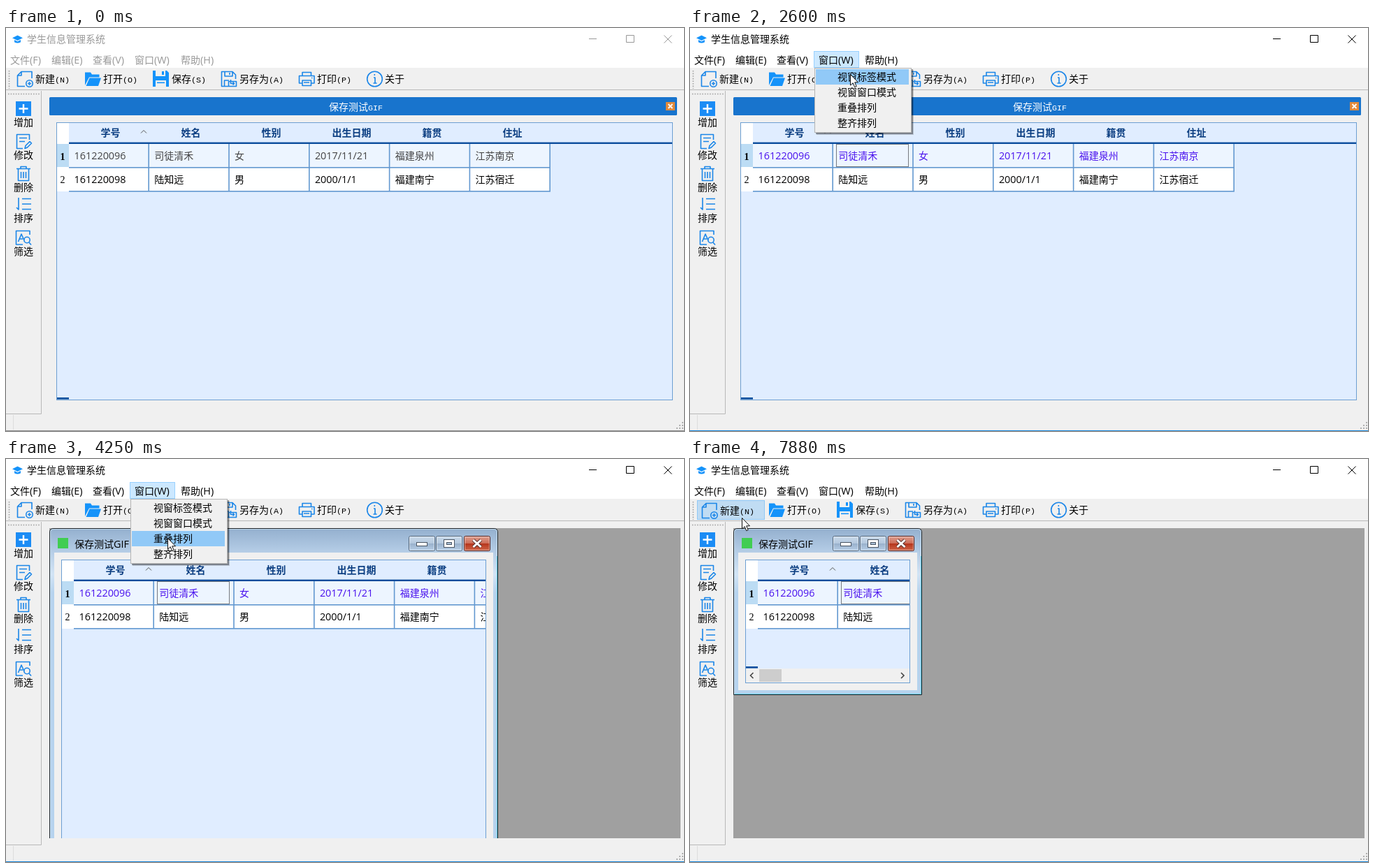
Write an HTML page that moves like this. It is 970x577 px and loops after 8 s.

```html
<!DOCTYPE html>
<html lang="zh-CN">
<head>
<meta charset="utf-8">
<title>学生信息管理系统</title>
<style>
html, body { margin: 0; width: 100%; height: 100%; overflow: hidden; background: #f0f0f0; }
svg { display: block; }
text { font: 14px "Noto Sans CJK SC", "Noto Sans CJK", sans-serif; white-space: pre; }
.l { font: 14.4px "Open Sans", "Noto Sans", sans-serif; }
.m .l { font: 11.7px "Liberation Mono", monospace; }
.n { font: 14px "Liberation Serif", serif; }
.h { font-weight: 700; fill: #0a3d80; }
.c { text-anchor: middle; }
.b { font-weight: 700; }
.chrome { fill: #999; }
.ctl { fill: none; stroke: #999; }
.edge { fill: #8c8c8c; }
.sel { fill: #444; }
.focus { fill: none; stroke: #000; stroke-dasharray: 1 1; display: none; }
.active .chrome { fill: #000; }
.active .ctl { stroke: #000; }
.active .edge { fill: #1a86d9; }
.active .sel { fill: #4a12ee; }
.active .focus { display: inline; }
.i { fill: none; stroke: #1b86e8; stroke-width: 1.6; stroke-linejoin: round; }
.f { fill: #1593fa; }
</style>
</head>
<body>
<svg id="stage" width="970" height="577" viewBox="0 0 970 577"></svg>
<script>
const rect = (x, y, w, h, fill, more = '') =>
  `<rect x="${x}" y="${y}" width="${w}" height="${h}" fill="${fill}" ${more}/>`;
const box = (x, y, w, h, fill, stroke, more = '') =>
  rect(x + .5, y + .5, w - 1, h - 1, fill, `stroke="${stroke}" ${more}`);
const path = (d, cls = 'i', more = '') => `<path d="${d}" class="${cls}" ${more}/>`;
const line = (d, color, width = 1) => path(d, '', `fill="none" stroke="${color}" stroke-width="${width}"`);
// x, vertical centre, text; Latin runs get their own face
const text = (x, y, s, cls = '') =>
  `<text x="${x}" y="${y + 5}" class="${cls}">${s.replace(/[ -~]+/g, r => `<tspan class="l">${r}</tspan>`)}</text>`;
const clip = (x, y, w, h, body) => `<svg x="${x}" y="${y}" width="${w}" height="${h}">${body}</svg>`;
const group = (id, body) => `<g id="${id}">${body}</g>`;

const heads = ['学号', '姓名', '性别', '出生日期', '籍贯', '住址'];
const rows = [
  ['161220096', '司徒清禾', '女', '2017/11/21', '福建泉州', '江苏南京'],
  ['161220098', '陆知远', '男', '2000/1/1', '福建南宁', '江苏宿迁']
];

function table(x, y, w, h, scroll) {
  const grid = '#6398d0', dark = '#0b4c9c';
  let s = rect(0, 0, w, h, '#e0edff') + rect(1, 1, 17, 98, '#fff') + rect(1, 31, 17, 33, '#bcdcf4');
  s += rect(18, 31, 688, 33, '#edf5ff') + rect(18, 65, 688, 33, '#fff');
  s += rect(18, 64, 689, 1.6, grid) + rect(18, 98, 689, 1.6, grid);
  heads.forEach((t, i) => {
    s += rect(131.4 + 114.8 * i, 31, 1.6, 68, grid);
    s += text(77.5 + 115 * i, 15, t, 'h c');
    rows.forEach((r, j) => s += text(25.5 + 114.8 * i, 47.5 + 34 * j, r[i], j ? '' : 'sel'));
  });
  s += rect(18, 28.6, w, 2.4, dark) + line('M121 15.5l4-4 4 4', '#555');
  s += `<text x="9" y="54" class="n c b">1</text><text x="9" y="87" class="n c">2</text>`;
  s += '<rect x="137.5" y="31.5" width="103" height="32" class="focus"/>';
  s += rect(0, h - (scroll ? 24 : 4), 18, 2.6, dark);
  if (scroll) {
    s += rect(1, h - 21, w - 2, 20, '#f0f0f0') + rect(20, h - 20, 32, 18, '#cdcdcd');
    s += line(`M11.5 ${h - 15}l-4 4 4 4M${w - 13} ${h - 15}l4 4-4 4`, '#444', 1.6);
  }
  return clip(x, y, w, h, s + box(0, 0, w, h, 'none', '#6d9fd2'));
}

function subWindow(w, h, scroll) {
  const button = (x, fill, edge) =>
    box(x, 11, 38, 22, fill, edge, 'rx="2"') + box(x + 1, 12, 36, 20, 'none', '#fff', 'rx="1" stroke-opacity=".45"');
  const a = w - 128, b = w - 89, c = w - 49;
  const frame = i => `M${i} ${h - i}V6Q${i} ${i} 6 ${i}H${w - 6}Q${w - i} ${i} ${w - i} 6V${h - i}Z`;
  return path(frame(.5), '', 'fill="url(#aero)" stroke="#1c2228"') +
    path(frame(1.5), '', 'fill="none" stroke="#d5ecf8" stroke-opacity=".75"') +
    line(`M${w - 1.5} 40V${h - 1.5}H2`, '#62d2ea') +
    rect(7, 35, w - 14, h - 42, '#f0f0f0') +
    rect(12, 14, 15, 15, '#41cd52') + text(36, 22.5, '保存测试GIF') +
    button(a, 'url(#glass)', '#54677c') + button(b, 'url(#glass)', '#54677c') + button(c, 'url(#red)', '#5c2018') +
    box(a + 11, 20, 16, 6, '#fff', '#4a5563') +
    box(b + 11, 16, 16, 12, '#fff', '#4a5563') + box(b + 15, 20, 8, 4, '#a9bfd6', '#4a5563') +
    line(`M${c + 13.5} 17l11 10m0-10l-11 10`, '#5a3430', 5) + line(`M${c + 13.5} 17l11 10m0-10l-11 10`, '#fff', 3) +
    table(17, 45, w - 34, h - 62, scroll);
}

const gradient = (id, y, stops) => `<linearGradient id="${id}" gradientUnits="${y ? 'userSpaceOnUse' : 'objectBoundingBox'}"
  x1="0" x2="0" y1="0" y2="${y || 1}">${stops.map(([o, c]) => `<stop offset="${o}" stop-color="${c}"/>`).join('')}</linearGradient>`;

const defs = '<defs>' +
  gradient('aero', 100, [[0, '#93afce'], [.35, '#b6cee7'], [.66, '#d2e4f5'], [.92, '#b6d3ee']]) +
  gradient('glass', 0, [[0, '#cbdbeb'], [.48, '#b4c8de'], [.5, '#98b0cb'], [1, '#b9d0e8']]) +
  gradient('red', 0, [[0, '#e0a293'], [.48, '#cd6d58'], [.5, '#b5341b'], [1, '#d0674a']]) + '</defs>';

function chrome() {
  let s = rect(0, 0, 970, 577, '#f0f0f0') + rect(0, 0, 970, 57, '#fff');
  s += path('M9 14.3L16.5 10.5L24 14.3L16.5 18ZM12 17V20.2Q16.5 23 21 20.2V17L16.5 19.3Z', 'f');
  s += text(30, 16, '学生信息管理系统', 'chrome');
  s += path('M834 15.5h11M887.5 10.5h11v10h-11zM941.5 10.5l11 11m0-11l-11 11', 'ctl');
  s += line('M0 88.5H970M50.5 90V552.5H0', '#b9b9b9') + line('M10.5 554V575', '#dcdcdc');
  s += path('M4.5 61V87M3 94.5H49', '', 'stroke="#a0a0a0" stroke-width="1.6" stroke-dasharray="1.6 2"');
  for (let i = 0; i < 3; i++) for (let j = 0; j <= i; j++) s += rect(967 - 4 * j, 564 + 4 * i, 2, 2, '#b0b0b0');
  return s + '<rect y="576" width="970" height="1" class="edge"/>';
}

const floppyDisk = '<path fill-rule="evenodd" class="f" d="M210 61h20l3 3v20h-23zM214 61v8h14v-8zM214 75v9h15v-9z"/>' +
  rect(223, 62, 3, 5, '#1593fa') + rect(216, 77.5, 11, 1.6, '#1593fa');

const tools = [
  [42, '新建(N)', path('M37 72V62.5H22L16.5 68V83.5H27M22 62.5V68H16.5') +
    '<circle cx="33.5" cy="79.5" r="4.7" class="i"/>' + path('M33.5 77v5M31 79.5h5')],
  [139, '打开(O)', path('M113 82V63.5h8l2 3h10.5v4H119z', 'f') + path('M119.5 71.5H136L132 83H114.5z', 'f')],
  [237, '保存(S)', floppyDisk],
  [334, '另存为(A)', path('M318 83.5H308.5V62.5H324L328.5 67V73M313 62.5V69h11v-6.5M320 64v3M312.5 83V75H319') +
    path('M318.5 76.5H329.5V83.5H318.5zM321.5 74v5.5h5m-2-2l2 2-2 2')],
  [445, '打印(P)', path('M424 68V63.5H436.5V68M424 79H419.5V68.5H441V79H436.5M424 75H436.5V82.5H424zM426 78h8M437 71.5h1.5')],
  [542, '关于', '<circle cx="527.5" cy="73" r="10.8" class="i"/>' + path('M526 71h2v8m-2.5 0h5M527.3 66v2')]
];

const sideTools = [
  [135, '增加', rect(14, 105, 22, 21, '#1b8cf5') + line('M25 109v13M18.5 115.5h13', '#fff', 2.4)],
  [182, '修改', path('M33.5 160V152.5H15.5V172.5H24M19 157.5h11M19 162.5h8M27 172.5l1-4 6-6 2.5 2.5-6 6z')],
  [228, '删除', path('M15 201.5H35M21 201V198.5H29V201M17.5 202V218.5H32.5V202M21.5 206v9M25 206v9M28.5 206v9')],
  [272, '排序', path('M18 243V260l-3-3M23 244.5H36M23 252H36M23 259.5H36')],
  [320, '筛选', path('M34 296V290.5H14.5V310H24M17.5 306L22 295l4 9M19 302h5') +
    '<circle cx="30" cy="303.5" r="4.2" class="i"/>' + path('M33 307l3 3.5')]
];

const menus = [[6, '文件(F)'], [65, '编辑(E)'], [124, '查看(V)'], [184, '窗口(W)'], [250, '帮助(H)']];
const items = ['视窗标签模式', '视窗窗口模式', '重叠排列', '整齐排列'];

const tabView = rect(62, 99, 898, 26, '#1874cd', 'rx="1.5"') + text(462, 112.5, '保存测试GIF', 'm').replace('<text', '<text fill="#fff"') +
  rect(944, 106, 13, 12, '#e08a3c') + line('M947.5 109l6 6m0-6l-6 6', '#fff', 1.8) + table(72, 135, 882, 398);

stage.innerHTML = defs + chrome() +
  box(177, 33, 65, 24, '#cce8ff', '#99d1ff', 'id="menuHot"') +
  menus.map(([x, s]) => text(x, 46, s, 'chrome')).join('') +
  box(10, 59, 97, 28, '#d8e6f2', '#c0dcf3', 'id="newHot"') +
  box(204, 59, 98, 28, '#d8e6f2', '#c0dcf3', 'id="saveHot"') +
  tools.map(([x, s, icon], i) => group('tool' + i, icon + text(x, 73, s, 'm'))).join('') +
  sideTools.map(([y, s, icon]) => icon + text(25, y, s, 'c m')).join('') +
  group('tabs', tabView) +
  group('area', clip(62, 99, 903, 444, rect(0, 0, 903, 444, '#a0a0a0') +
    group('large', subWindow(642, 500)) + group('small', subWindow(270, 239, true)))) +
  group('menu', rect(181, 60, 139, 93, '#000', 'opacity=".16"') + rect(180, 59, 139, 93, '#000', 'opacity=".35"') +
    box(178, 57, 139, 93, '#f0f0f0', '#b4b4b4') + rect(180, 59, 133, 22, '#91c9f7', 'id="mark"') +
    items.map((s, i) => text(211, 70 + 22 * i, s)).join('')) +
  group('cursor', path('M0 0V15.5L3.7 12.2L6.2 18.2L8.7 17.1L6.2 11.3H11Z', '', 'fill="#fff" stroke="#111"'));

const LOOP = 8000;
// from, to, steps, x, y
const moves = [
  [420, 970, 8, 224, 47],
  [1270, 1500, 4, 229, 73],
  [2040, 2270, 4, 226, 47],
  [2520, 2600, 2, 229, 66],
  [2680, 2750, 2, 229, 94],
  [3150, 3380, 4, 227, 47],
  [3930, 4250, 5, 231, 113],
  [6650, 7190, 8, 73, 80],
  [7420, 7490, 2, 73, 89],
  [7720, 7880, 3, 74, 84]
];
const menuOpen = [[1120, 1810], [2440, 3000], [3610, 6020]];
const ACTIVE = 1050, WINDOWED = 3000, CASCADED = 6020, PRESSED = 7880;

function pointer(t) {
  let x = 900, y = 600;
  for (const [from, to, n, tx, ty] of moves) {
    if (t < from) break;
    const k = Math.min(n, Math.floor((t - from) / (to - from) * (n - 1)) + 1) / n;
    const e = k * k * (3 - 2 * k);
    x += (tx - x) * e;
    y += (ty - y) * e;
  }
  return [x, y];
}

const $ = id => document.getElementById(id);
const show = (id, on) => $(id).style.display = on ? 'inline' : 'none';

function draw(t) {
  const [x, y] = pointer(t), active = t >= ACTIVE;
  const span = menuOpen.find(([a, b]) => t >= a && t < b);
  const inside = (l, r, top, bottom) => x >= l && x < r && y >= top && y < bottom;
  const hover = (l, r) => active && !span && inside(l, r, 59, 87);
  const age = span ? t - span[0] : 0, pressed = t >= PRESSED;

  stage.classList.toggle('active', active);
  show('tabs', t < WINDOWED);
  show('area', t >= WINDOWED);
  show('large', t < CASCADED);
  show('small', t >= CASCADED);
  show('menuHot', span || active && inside(177, 242, 33, 57));
  show('newHot', hover(10, 107));
  show('saveHot', hover(204, 302));
  $('newHot').setAttribute('fill', pressed ? '#c0dcf3' : '#d8e6f2');
  $('newHot').setAttribute('stroke', pressed ? '#90c8f6' : '#c0dcf3');
  $('tool0').setAttribute('transform', `translate(${pressed ? '1 1' : '0 0'})`);
  show('menu', span);
  $('menu').style.opacity = age < 75 ? .45 : age < 150 ? .85 : 1;
  show('mark', inside(180, 313, 59, 147));
  $('mark').setAttribute('y', 59 + 22 * Math.floor((y - 59) / 22));
  show('cursor', t >= moves[0][0]);
  $('cursor').setAttribute('transform', `translate(${Math.round(x) + .5} ${Math.round(y) + .5})`);
}

function tick() {
  draw(performance.now() % LOOP);
  requestAnimationFrame(tick);
}
tick();
</script>
</body>
</html>
```
